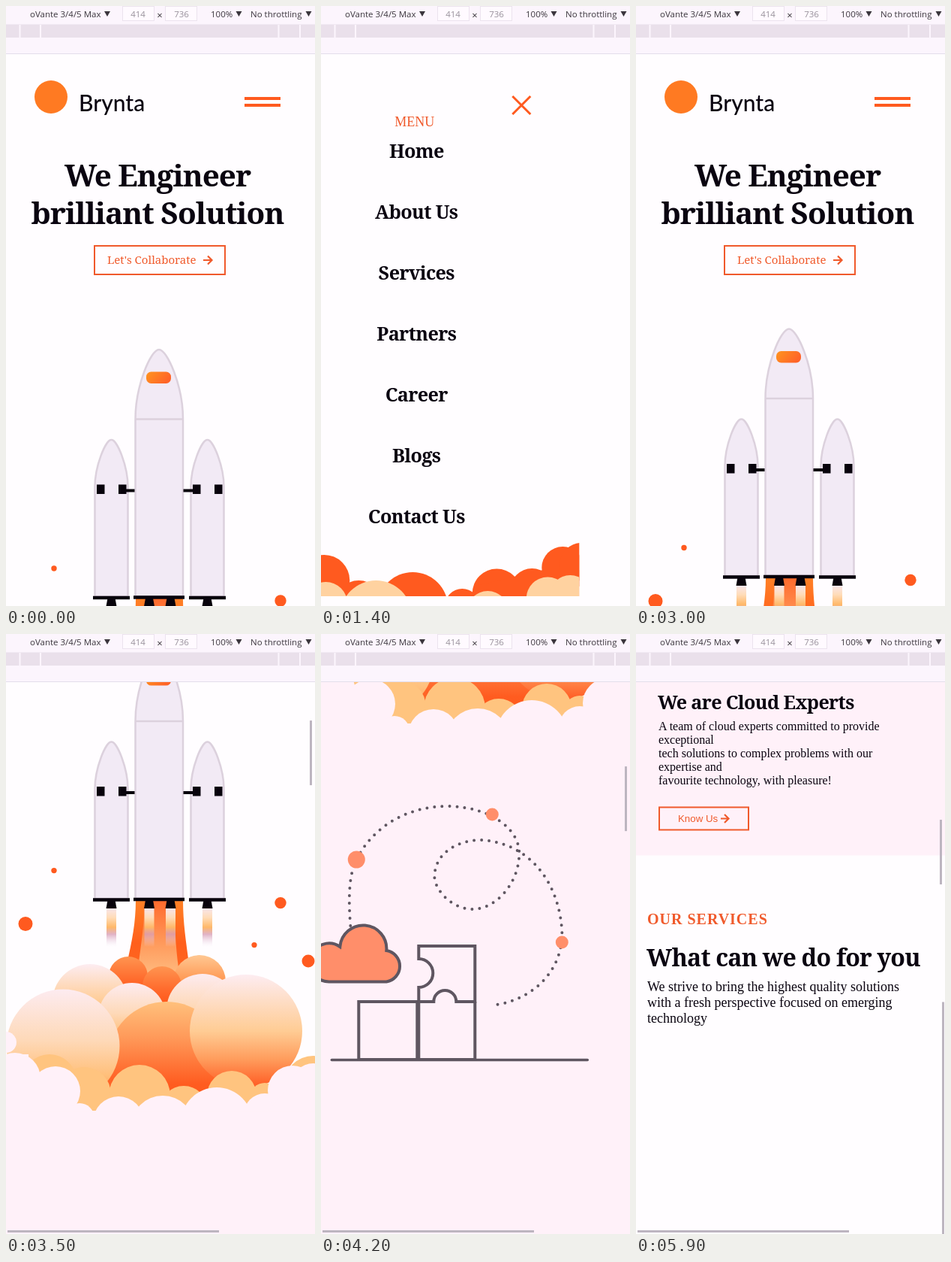
An HTML page for the animation above (6 s loop, 412 by 798 pixels).

```html
<!DOCTYPE html>
<html lang="en">
<head>
<meta charset="utf-8">
<style>
html, body { margin: 0; width: 100%; height: 100%; overflow: hidden; background: #fffdff; }
svg { display: block; }
.ui { font: 11.5px "Open Sans", "Noto Sans", sans-serif; fill: #3b363d; }
.head { font-family: "Noto Serif", serif; font-weight: 700; letter-spacing: -.025em; fill: #0a0410; }
.times { font-family: "Liberation Serif", serif; fill: #0a0410; }
.hot { fill: #f05a2c; }
.mid { text-anchor: middle; }
.arrow { fill: none; stroke: #f05a2c; stroke-width: 2.2; }
</style>
</head>
<body>
<svg width="412" height="798" viewBox="0 0 412 798">
  <defs>
    <clipPath id="view"><rect y="64" width="412" height="734"/></clipPath>
    <clipPath id="strip"><rect x="-100" y="700" width="444" height="85"/></clipPath>
    <linearGradient id="amber" x2="1" y2=".4"><stop stop-color="#ff951f"/><stop offset="1" stop-color="#ff6428"/></linearGradient>
  </defs>
  <rect width="412" height="798" fill="#fffdff"/>

  <g clip-path="url(#view)">
    <g id="page">
      <g id="hero">
        <circle cx="60" cy="121" r="22" fill="#ff7a22"/>
        <text x="97" y="140" font-family="Lato, sans-serif" font-size="30" font-weight="500" fill="#0a0410">Brynta</text>
        <path d="M318 123h48M318 132h48" stroke="#ff5a1f" stroke-width="4"/>
        <g class="head mid" font-size="40.500">
          <text x="202" y="239.500">We Engineer</text>
          <text x="202" y="289.500">brilliant Solution</text>
        </g>
        <rect x="118" y="319" width="174" height="38" fill="none" stroke="#f05a2c" stroke-width="2"/>
        <text x="135" y="343" class="hot" font-family="Noto Serif, serif" font-size="15">Let's Collaborate</text>
        <path class="arrow" d="M263 338h11M269 332.500l5.500 5.500l-5.500 5.500"/>
      </g>
      <g id="rocket"></g>
      <g id="plume"></g>
      <rect y="1040" width="412" height="774" fill="#fff1f9"/>

      <g transform="translate(0 1131)">
        <g id="puzzle" fill="none" stroke="#0a0410" stroke-width="4">
          <path d="M74 178C71 140 72 110 82 90C105 45 150 20 201 19C262 19 298 50 299 80C300 120 268 157 236 156C208 155 186 130 186 112C187 82 215 65 246 64C310 66 352 118 356 185C358 235 320 275 269 283" stroke-dasharray="0 10" stroke-linecap="round"/>
          <g fill="#ff5a1f" stroke="none">
            <circle cx="82" cy="90" r="11.500"/><circle cx="263" cy="30" r="8.500"/><circle cx="356" cy="200" r="8.500"/>
          </g>
          <path d="M49 356.500H390" stroke-width="3.500" stroke-linecap="round"/>
          <path d="M85 279H163V356H85ZM165 279V356H240V279"/>
          <path d="M163 279H185A15 15 0 0 1 215 279H240V205H165V222A18 18 0 0 1 165 260V279"/>
          <path d="M46 252.500A25.500 25.500 0 1 1 60 206A31 31 0 0 1 122 211A21 21 0 0 1 122 252.500Z" fill="#ff5a1f"/>
        </g>
        <g id="about">
          <text class="times hot" x="30" y="406" font-size="12" font-weight="700">WHO ARE WE</text>
          <text class="head" x="29" y="489" font-size="25.100">We are Cloud Experts</text>
          <g class="times" font-size="16" id="intro"></g>
          <rect x="31" y="619" width="119" height="30" fill="none" stroke="#f05a2c" stroke-width="2"/>
          <text class="hot" x="56" y="639" font-family="Liberation Sans, sans-serif" font-size="13.300">Know Us</text>
          <path class="arrow" d="M113 634h10M118 628.500l5.500 5.500l-5.500 5.500"/>
        </g>
      </g>
      <g transform="translate(0 1519)">
        <text class="times hot" x="15" y="387" font-size="20" font-weight="700" letter-spacing="1">OUR SERVICES</text>
        <text class="head" x="14" y="443" font-size="32.100">What can we do for you</text>
        <g class="times" font-size="18" id="offer"></g>
        <rect id="innerBar" x="408" y="490" width="3" height="400" fill="#bdb5c0"/>
      </g>
    </g>

    <g id="menu">
      <rect x="-600" y="64" width="1015" height="734" fill="#fffdff"/>
      <path d="M255 120l24 24M279 120l-24 24" stroke="#ff5a1f" stroke-width="3"/>
      <text class="times hot" x="98" y="160" font-size="18">MENU</text>
      <g class="head mid" font-size="25.200" id="links"></g>
      <g id="menuClouds" clip-path="url(#strip)"></g>
    </g>

    <g id="bars" fill="#bdb5c0">
      <rect id="vBar" x="405" width="3" height="86"/>
      <rect x="2" y="793" width="282" height="3"/>
    </g>
  </g>

  <g class="ui">
    <rect width="412" height="64" fill="#fcf5fd"/>
    <rect y="25" width="412" height="17" fill="#eae0eb"/>
    <path d="M0 24.500H412" stroke="#f1e9f3"/>
    <path d="M18.500 25v17M46 25v17M363.500 25v17M392 25v17" stroke="#fcf5fd" stroke-width="2"/>
    <path d="M0 63.500H412" stroke="#e3deeb"/>
    <g fill="#fffaff" stroke="#ece3ee">
      <rect x="155.500" y=".500" width="42" height="19"/><rect x="212.500" y=".500" width="42" height="19"/>
    </g>
    <text x="32" y="15">oVante 3/4/5 Max</text>
    <text x="273" y="15">100%</text>
    <text x="326" y="15">No throttling</text>
    <g class="mid">
      <text x="176" y="15" fill="#98919b">414</text><text x="205" y="17" font-size="13">×</text><text x="234" y="15" fill="#98919b">736</text>
    </g>
    <path d="M131 7h8l-4 7zM306.500 7h8l-4 7zM399.500 7h8l-4 7z"/>
  </g>
</svg>

<script>
const $ = id => document.getElementById(id);
const LOOP = 6000;

const discs = (fill, list) => list.map(([x, y, r]) =>
  `<circle cx="${x}" cy="${y}" r="${r}" fill="${fill}"/>`).join('');

const shade = (id, ...stops) => `<linearGradient id="${id}" x2="0" y2="1">` +
  stops.map(([at, color, alpha = 1]) =>
    `<stop offset="${at}" stop-color="${color}" stop-opacity="${alpha}"/>`).join('') +
  '</linearGradient>';

const lines = (x, y, step, list) => list.map((s, i) =>
  `<text x="${x}" y="${y + i * step}">${s}</text>`).join('');

const nozzle = x => `<rect x="${x - 6.5}" y="770" width="13" height="52" fill="url(#jet)"/>
  <path d="M${x - 5} 760h10l2 11h-14z" fill="#08030c"/>`;

const booster = x => `${nozzle(x)}
  <path d="M${x - 22} 758V612C${x - 22} 585 ${x - 8} 549.5 ${x} 549.5S${x + 22} 585 ${x + 22} 612V758Z" class="hull"/>
  <path d="M${x - 24.500} 759.500h49" stroke="#08030c" stroke-width="4.500"/>
  <path d="M${x - 19.500} 609h10.500v12.500h-10.500zM${x + 9.500} 609h10.500v12.500h-10.500z" fill="#08030c"/>`;

function build() {
  $('rocket').innerHTML = `<defs>
    ${shade('jet', [0, '#f8e6ee'], [.25, '#ffdcb8'], [.5, '#ffb868'], [.68, '#d9a0b8', .8], [1, '#f0e4f4', 0])}
    ${shade('fire', [0, '#ff8126'], [.5, '#ff5f1c'], [1, '#ff6a24'])}
    ${shade('core', [0, '#ff6a2c'], [.5, '#ff9a5c'], [1, '#ffc78c'])}
    </defs><style>.hull { fill: #f2eaf5; stroke: #dcd1dd; stroke-width: 2.5 }</style>` +
    discs('#ff5a1f', [[64, 720.5, 3.7], [26, 791.5, 9.5], [366, 763.5, 7.7], [331, 819.5, 3.6], [403, 841, 8.500]]) +
    `<path d="M173 760C173 790 168 815 161 845V875H244V845C240 815 236 790 236 760Z" fill="url(#fire)"/>
    <path d="M185 760C184 795 180 820 176 850V875H230V850C226 820 225 795 225 760Z" fill="url(#core)"/>
    ${nozzle(191)}${nozzle(219.5)}
    <path d="M172.500 758V522C172.500 478 193 429.500 204 429.500S236 478 236 522V758Z" class="hull"/>
    <path d="M172.500 522H236" class="hull"/>
    <rect x="187" y="459" width="33" height="15.500" rx="6.500" fill="url(#amber)"/>
    <path d="M170 759H238" stroke="#08030c" stroke-width="4.500"/>
    ${booster(140.5)}${booster(268.5)}
    <path d="M160 617h11.500M236.500 617h13" stroke="#08030c" stroke-width="4"/>`;

  $('plume').setAttribute('transform', 'translate(0 405)');
  $('plume').innerHTML = `<defs>
    ${shade('puff', [0, '#fdecf1'], [.5, '#ffcc94'], [.75, '#ff9c5c'], [1, '#ff5a22'])}
    ${shade('pale', [0, '#fdebf0'], [.45, '#fed9b8'], [.75, '#ffc07c'], [1, '#ff9448'])}
    ${shade('glow', [0, '#ffc07c'], [.3, '#ff9a5a'], [.7, '#ff5c20'], [1, '#ff5518'])}
    ${shade('soft', [0, '#ffc792'], [.5, '#ff9650'], [1, '#ff6a2a'])}
    ${shade('deep', [0, '#ff9450'], [.6, '#ff6a2c'], [1, '#ff5518'])}
    </defs>` +
    discs('url(#deep)', [[163, 456, 26], [140, 580, 40]]) +
    discs('url(#soft)', [[258, 463, 35]]) +
    discs('url(#deep)', [[208, 469, 26]]) +
    discs('url(#puff)', [[112, 490, 50]]) +
    discs('url(#pale)', [[168, 510, 45], [262, 501, 48]]) +
    discs('url(#glow)', [[214, 568, 78]]) +
    discs('url(#puff)', [[320, 529, 75]]) +
    discs('url(#pale)', [[76, 549, 75.5]]) +
    discs('#ffc47f', [[58, 596, 36], [104, 613, 36], [178, 615, 41], [237, 634, 32],
      [301, 615, 33], [345, 618, 20], [410, 602, 40]]) +
    '<path d="M40 615H412V645H40Z" fill="#ffc47f"/>' +
    discs('#fff1f9', [[0, 544, 14], [12, 592, 34], [66, 609, 33], [98, 645, 20], [150, 650, 34],
      [209, 658, 43], [281, 652, 48], [345, 640, 28], [382, 608, 33], [410, 602, 30]]) +
    '<path d="M0 560H30V610H70V637H412V645H0ZM375 605H412V645H340Z" fill="#fff1f9"/>';

  $('intro').innerHTML = lines(30, 517, 18, ['A team of cloud experts committed to provide',
    'exceptional', 'tech solutions to complex problems with our', 'expertise and',
    'favourite technology, with pleasure!']);
  $('offer').innerHTML = lines(15, 476, 21, ['We strive to bring the highest quality solutions',
    'with a fresh perspective focused on emerging', 'technology']);
  $('links').innerHTML = lines(127, 202, 81,
    ['Home', 'About Us', 'Services', 'Partners', 'Career', 'Blogs', 'Contact Us']);

  $('menuClouds').innerHTML =
    discs('#ff5a1f', [[-58, 768, 36], [-28, 757, 26], [4, 764, 34], [50, 796, 32], [122, 800, 47],
      [188, 798, 23], [234, 781, 32.5], [281, 777, 29], [322, 747, 28], [347, 743, 29]]) +
    '<path d="M296 750H344V785H210V770Z" fill="#ff5a1f"/>' +
    discs('#ffd2a0', [[-50, 795, 30], [6, 795, 29], [73, 812, 48], [222, 806, 28], [302, 788, 28.5], [332, 784, 27]]);
}

const clamp = v => Math.max(0, Math.min(1, v));
const span = (t, a, b) => clamp((t - a) / (b - a));
const easeOut = p => 1 - (1 - p) ** 2;
const smooth = p => p * p * (3 - 2 * p);

const keys = [[3000, 0], [3500, 405], [3800, 725], [4100, 914], [4200, 921], [4420, 921],
  [5000, 1131], [5400, 1245], [5520, 1245], [5900, 1519], [6000, 1560]];

const slope = i => {
  const a = keys[i], b = keys[i + 1];
  return a && b ? (b[1] - a[1]) / (b[0] - a[0]) : 0;
};
const tangent = i => {
  const a = slope(i - 1), b = slope(i);
  return a * b > 0 ? 2 * a * b / (a + b) : 0;
};

// Monotone cubic through the scroll keys.
function scrollAt(t) {
  if (t <= keys[0][0]) return 0;
  let i = 0;
  while (i < keys.length - 2 && t > keys[i + 1][0]) i++;
  const [t0, y0] = keys[i], [t1, y1] = keys[i + 1];
  const d = t1 - t0, p = (t - t0) / d, q = 1 - p;
  return y0 * q * q * (1 + 2 * p) + y1 * p * p * (3 - 2 * p) +
    d * p * q * (q * tangent(i) - p * tangent(i + 1));
}

// Slides in from the left, rests 75 px further right, then slides back out.
function menuX(t) {
  if (t < 1400) return -415 * (1 - easeOut(span(t, 800, 1400)));
  if (t < 2350) return 75 * easeOut(span(t, 1400, 1900));
  return 75 - 490 * smooth(span(t, 2350, 2950));
}

const move = (id, x, y) => $(id).setAttribute('transform', `translate(${x.toFixed(2)} ${y.toFixed(2)})`);
const show = (id, on) => $(id).setAttribute('visibility', on ? 'visible' : 'hidden');

function draw(t) {
  const top = scrollAt(t);
  move('page', 0, -top);
  move('rocket', 0, 27.5 * (1 - span(t, 0, 2100)));
  move('menu', menuX(t), 0);
  show('menu', t > 800 && t < 2950);

  const enter = easeOut(span(t, 3860, 4690));
  move('puzzle', -100 * (1 - enter), 0);
  $('puzzle').setAttribute('opacity', enter);
  $('about').setAttribute('opacity', smooth(span(t, 4250, 4800)));

  show('bars', t > 3050);
  $('vBar').setAttribute('y', 67 + top / 8.44);
  show('innerBar', t > 5580);
}

build();
const start = performance.now();
function tick() {
  draw((performance.now() - start) % LOOP);
  requestAnimationFrame(tick);
}
tick();
</script>
</body>
</html>
```
